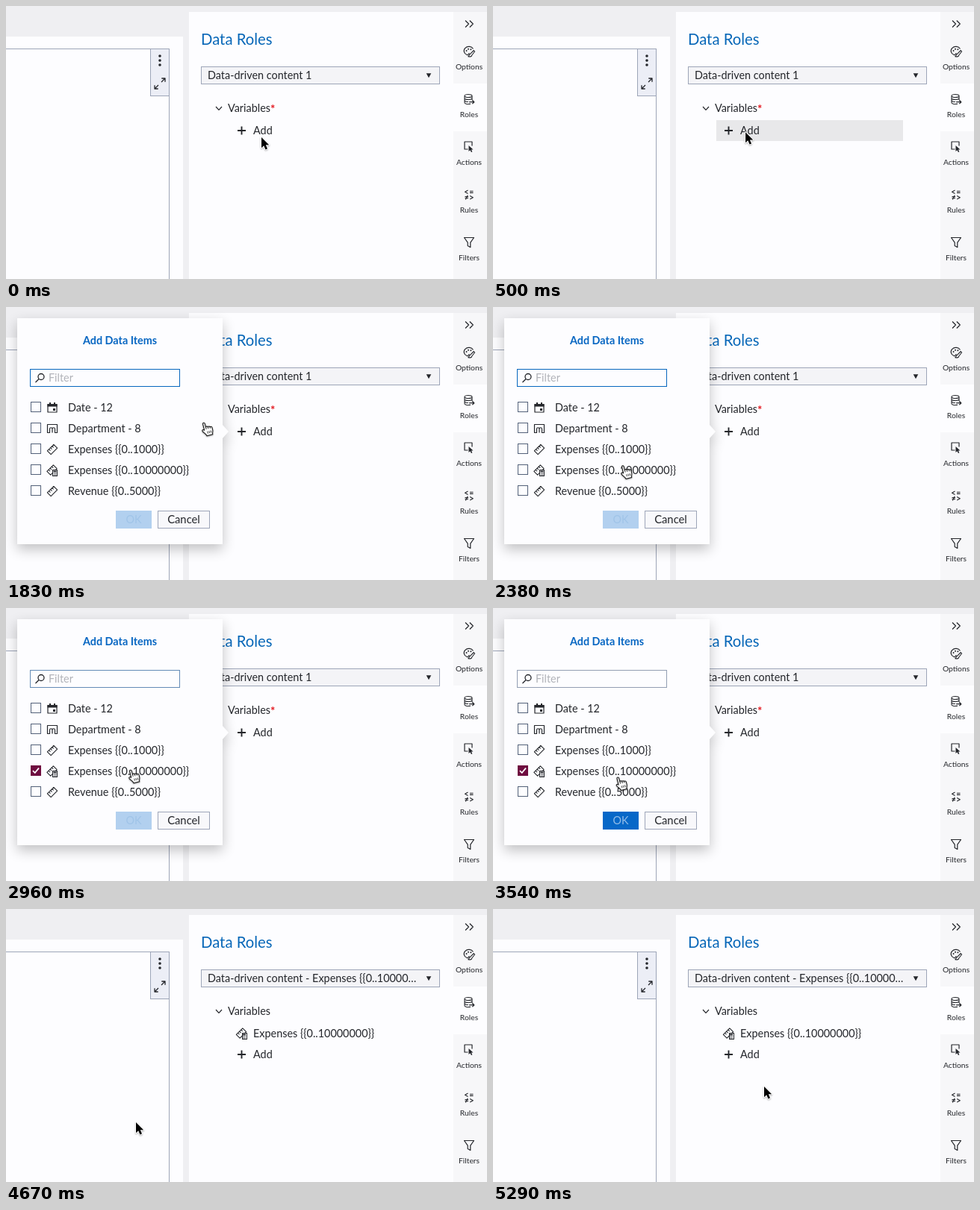
These frames come from a looping animation (644 px wide and 366 px high, 5370 ms). An HTML page with a canvas:

```html
<!DOCTYPE html>
<html lang="en">
<head>
<meta charset="utf-8">
<title>Adding a data item</title>
<style>
html, body { margin: 0; width: 100%; height: 100%; overflow: hidden; background: #efeff2; }
canvas { display: block; }
</style>
</head>
<body>
<canvas id="stage" width="644" height="366"></canvas>
<script>
const ctx = document.getElementById('stage').getContext('2d');
const LOOP = 5370, OPEN = 610, CLOSE = 4540, CHECK = 2720, ENABLE = 3020;
const INK = '#24262b', WHITE = '#fdfdff', GRAY = '#efeff2', EDGE = '#9da5b8', BLUE = '#0767b8';
const FAMILY = 'Lato, "Open Sans", sans-serif';

const clamp = v => Math.max(0, Math.min(1, v));
const ramp = (t, a, b) => clamp((t - a) / (b - a));
const ease = {
  in: p => p * p,
  out: p => 1 - (1 - p) * (1 - p),
  both: p => p * p * (3 - 2 * p)
};

// end time, x, y, easing of the stretch leading there
const track = [
  [40, 342, 176, 'both'], [540, 338, 169, 'both'],
  [1540, 338, 169, 'both'], [1830, 269, 157, 'in'], [2580, 171, 219, 'out'],
  [3420, 171, 219, 'both'], [3920, 174, 286, 'both'],
  [4670, 174, 286, 'both'], [5290, 363, 238, 'both']
];

function pointer(t) {
  let prev = track[0];
  for (const key of track) {
    if (t <= key[0]) {
      const p = key === prev ? 1 : ease[key[3]](ramp(t, prev[0], key[0]));
      return [prev[1] + (key[1] - prev[1]) * p, prev[2] + (key[2] - prev[2]) * p];
    }
    prev = key;
  }
  return [prev[1], prev[2]];
}

function mix(a, b, p) {
  return 'rgb(' + a.map((v, i) => Math.round(v + (b[i] - v) * p)).join(',') + ')';
}

function text(str, x, y, color = INK, font = '14.4px', align = 'left') {
  ctx.font = font + ' ' + FAMILY;
  ctx.fillStyle = color;
  ctx.textAlign = align;
  ctx.fillText(str, x, y);
}

function rect(x, y, w, h, fill) {
  ctx.fillStyle = fill;
  ctx.fillRect(x, y, w, h);
}

function box(x, y, w, h, fill, edge) {
  rect(x, y, w, h, fill);
  ctx.strokeStyle = edge;
  ctx.lineWidth = 1;
  ctx.strokeRect(x + .5, y + .5, w - 1, h - 1);
}

function path(d, x, y, { stroke = INK, fill, width = 1.2, turn = 0 } = {}) {
  const p = new Path2D(d);
  ctx.save();
  ctx.translate(x, y);
  ctx.rotate(turn);
  ctx.lineJoin = 'round';
  ctx.lineWidth = width;
  if (fill) { ctx.fillStyle = fill; ctx.fill(p); }
  if (stroke) { ctx.strokeStyle = stroke; ctx.stroke(p); }
  ctx.restore();
}

function dot(x, y, r, color = INK) {
  ctx.fillStyle = color;
  ctx.beginPath();
  ctx.arc(x, y, r, 0, 7);
  ctx.fill();
}

const icons = {
  collapse(x, y) { path('M-5-4.5L-.5 0L-5 4.5M.8-4.5L5.3 0L.8 4.5', x, y); },
  options(x, y) {
    path('M5.5-3.5A6.5 5.8 0 1 0-2.5 4.6C-.5 4.8-1 2.8 .5 2.2', x, y);
    path('M6.3-1.5L1.5 3.4C.2 3.8 0 5.8-1.2 6.6C1.8 7.4 4 6.4 3.7 5L7.6 0Z', x, y, { width: 1.1 });
    dot(x - 3.5, y - 1, 1);
    dot(x - 1, y - 3.3, 1);
    dot(x + 2.4, y - 2.8, 1);
  },
  roles(x, y) {
    path('M-6-4.5A5 2 0 0 1 4-4.5A5 2 0 0 1-6-4.5V4.5A5 2 0 0 0-1 6.5A5 2 0 0 0 2 6.1' +
      'M4-4.5V1.2M-6-1.5A5 2 0 0 0 4-1.5M-6 1.5A5 2 0 0 0-1 3.5', x, y, { width: 1.1 });
    path('M0 3.7H6.5M4.3 1.3L6.8 3.7L4.3 6.1', x, y, { width: 1.3 });
  },
  actions(x, y) {
    path('M-1.5 3H-6V-7H4V-1.5', x, y);
    path('M-.5-2V6L1.5 4.2L2.9 7L4.3 6.4L3 3.6H5.5Z', x, y, { fill: INK, stroke: null });
  },
  rules(x, y) {
    path('M-1.5-6L-5.5-3.8L-1.5-1.6M1-4.8H5.5M1-2.6H5.5' +
      'M-5.5 2.6H-1M-5.5 4.8H-1M-1.8 .8L-4.7 6.6M1.2 1.5L5.3 3.7L1.2 5.9', x, y, { width: 1.1 });
  },
  filters(x, y) { path('M-6.5-6.5H6.5L1.8 .2V6.5L-1.8 4.4V.2Z', x, y); },
  calendar(x, y) {
    path('M-6-4.5H6V6H-6Z', x, y);
    rect(x - 6.5, y - 5, 13, 3.5, INK);
    rect(x - 4, y - 7, 2, 3, INK);
    rect(x + 2, y - 7, 2, 3, INK);
    rect(x + 1, y + 1, 3, 3, INK);
  },
  category(x, y) {
    path('M0 5.5V.5A1.75 1.75 0 0 1 3.5 .5V5.5H6.5V-5.5H-6.5V5.5H-3.5V.5A1.75 1.75 0 0 1 0 .5', x, y);
  },
  measure(x, y) {
    path('M-6-3.4H6V3.4H-6ZM-3-3.4V-.6M0-3.4V-.6M3-3.4V-.6', x, y,
      { turn: -Math.PI / 4, width: 1.1 });
  },
  calculated(x, y) {
    icons.measure(x - .5, y - .5);
    box(Math.round(x), Math.round(y) - 1, 7, 9, WHITE, INK);
    rect(x + 1.5, y + .5, 4, 2, INK);
    for (let i = 0; i < 4; i++) rect(x + 2 + 2 * (i % 2), y + 3.5 + 2 * (i >> 1), 1.2, 1.2, INK);
  },
  add(x, y) { path('M-5.5 0H5.5M0-5.5V5.5', x, y, { width: 1.9 }); }
};

function canvasArea() {
  rect(0, 0, 644, 366, GRAY);
  rect(0, 41, 237, 325, WHITE);
  rect(0, 57, 219, 1, EDGE);
  rect(218, 57, 1, 309, EDGE);
  box(193, 57, 26, 64, '#eceef6', EDGE);
  for (const y of [67, 73, 79]) dot(206, y, 1.8);
  path('M2-2L7-7M2.3-7H7V-2.3M-2 2L-7 7M-7 2.3V7H-2.3', 206, 104, { width: 1.3 });
}

function sidebar() {
  rect(599, 8, 45, 358, '#f7f7f9');
  rect(599, 104, 45, 64, WHITE);
  icons.collapse(620, 24);
  ['Options', 'Roles', 'Actions', 'Rules', 'Filters'].forEach((name, i) => {
    icons[name.toLowerCase()](620, 61 + 64 * i);
    text(name, 620, 85 + 64 * i, INK, '10.3px', 'center');
  });
}

function rolesPanel(t, added) {
  rect(245, 8, 354, 358, WHITE);
  text('Data Roles', 261, 52, BLUE, '20.3px');
  box(261, 81, 320, 24, '#f4f4f7', EDGE);
  text(added ? 'Data-driven content - Expenses {{0..10000…' : 'Data-driven content 1', 270, 98);
  path('M-3.3-2.8H3.3L0 3.2Z', 566, 93, { fill: INK, stroke: null });
  path('M-4-2L0 2.4L4-2', 285, 137);
  text('Variables', 297, 142);
  if (!added) text('*', 297 + ctx.measureText('Variables').width, 143, '#e3131b', 'bold 15px');

  const hover = ramp(t, 60, 180) * (1 - ramp(t, 1640, 1740));
  if (hover) {
    ctx.globalAlpha = hover;
    rect(299, 153, 250, 28, '#e8e8ea');
    ctx.globalAlpha = 1;
  }
  if (added) {
    icons.calculated(315.5, 167);
    text('Expenses {{0..10000000}}', 331, 172);
  }
  const y = added ? 195 : 167;
  icons.add(315.5, y);
  text('Add', 331, y + 5);
}

const items = [
  ['calendar', 'Date - 12'],
  ['category', 'Department - 8'],
  ['measure', 'Expenses {{0..1000}}'],
  ['calculated', 'Expenses {{0..10000000}}'],
  ['measure', 'Revenue {{0..5000}}']
];

function dialog(t) {
  ctx.save();
  ctx.shadowColor = 'rgba(0,0,0,.24)';
  ctx.shadowBlur = 17;
  ctx.shadowOffsetY = 7;
  path('M15 15H290V158L298 167L290 176V318H15Z', 0, 0, { fill: WHITE, stroke: null });
  ctx.restore();

  text('Add Data Items', 152.5, 50, '#0766c2', 'bold 14.4px', 'center');

  const focus = ramp(t, 1210, 1380) * (1 - ramp(t, 2630, 3130));
  box(32, 83, 201, 24, WHITE, mix([146, 158, 178], [7, 103, 190], focus));
  ctx.strokeStyle = INK;
  ctx.lineWidth = 1.3;
  ctx.beginPath();
  ctx.arc(47, 93.5, 4, 0, 7);
  ctx.moveTo(44, 96.5);
  ctx.lineTo(39.5, 101);
  ctx.stroke();
  text('Filter', 57, 100, '#b1b3b9');

  items.forEach(([icon, label], i) => {
    const y = 134 + 28 * i;
    const on = i === 3 && t >= CHECK;
    box(33, y - 7, 14, 14, on ? '#6f0d40' : WHITE, on ? '#6f0d40' : '#536179');
    if (on) path('M-4 .2L-1.3 3L4-3.4', 40, y, { stroke: '#fff', width: 1.8 });
    icons[icon](62, y + 1);
    text(label, 83, y + 6);
  });

  const ready = ramp(t, ENABLE, ENABLE + 80);
  rect(147, 273, 48, 24, mix([178, 208, 239], [7, 104, 200], ready));
  text('OK', 171, 290, mix([160, 196, 232], [145, 188, 232], ready), '14.4px', 'center');
  box(203, 273, 70, 24, '#f8f8fb', EDGE);
  text('Cancel', 238, 290, INK, '14.8px', 'center');
}

function cursor(t) {
  const [x, y] = pointer(t);
  const hand = t > OPEN && t < CLOSE && x < 290;
  ctx.save();
  ctx.shadowColor = 'rgba(0,0,0,.3)';
  ctx.shadowBlur = 2;
  ctx.shadowOffsetY = 1;
  if (hand) {
    const turn = -.25;
    path('M-3.6 8.5V.2C-3.6-1.9-.8-1.9-.8 .2V5.2C-.4 3.8 2 4 2 5.6C2.4 4.5 4.6 4.7 4.7 6.2' +
      'C5.2 5.4 7.4 5.8 7.3 7.6V11C7.3 13 5.8 14 5.8 16.8H-2.2C-2.4 14.6-4.6 12.6-6.2 9.8' +
      'C-7.4 7.8-5.2 6.4-3.6 8.5Z', x - 2, y - 1, { fill: '#fff', stroke: '#111', width: 1, turn });
    ctx.shadowColor = 'transparent';
    path('M-.8 5V8M2 5.8V8M4.7 6.4V8M0 11V14M2.2 11V14M4.4 11V14', x - 2, y - 1,
      { stroke: '#222', width: .8, turn });
  } else {
    const arrow = 'M0 0V14.2L3.2 11.2L5.5 16.4L8 15.3L5.8 10.3H10.2Z';
    path(arrow, x, y, { stroke: '#fff', width: 2 });
    ctx.shadowColor = 'transparent';
    path(arrow, x, y, { fill: '#000', stroke: null });
  }
  ctx.restore();
}

function draw(t) {
  canvasArea();
  rolesPanel(t, t >= CLOSE);
  sidebar();
  if (t >= OPEN && t < CLOSE) dialog(t);
  cursor(t);
}

let start;
function tick(now) {
  if (start === undefined) start = now;
  draw((now - start) % LOOP);
  requestAnimationFrame(tick);
}
draw(0);
requestAnimationFrame(tick);
</script>
</body>
</html>
```
